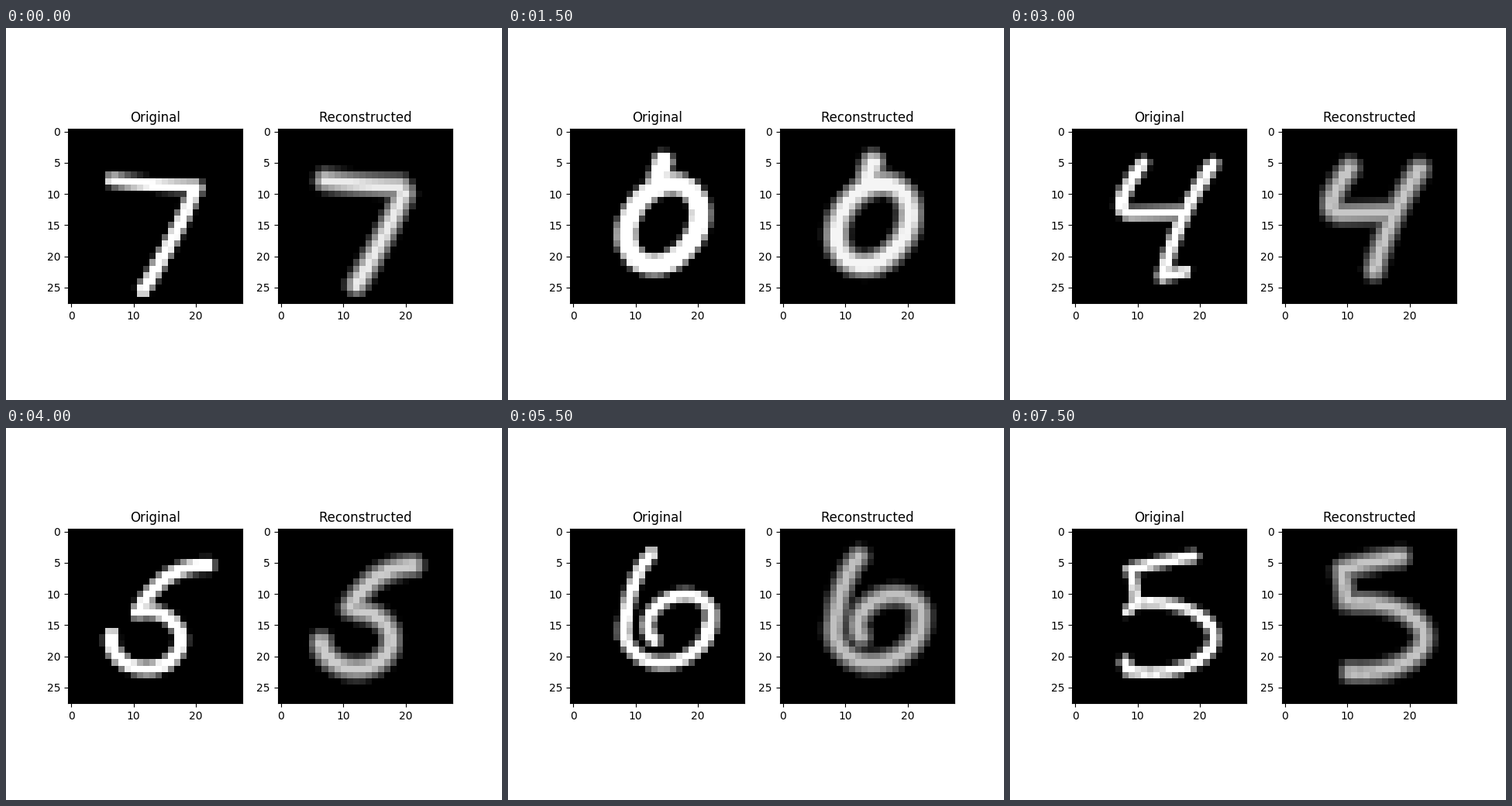
A matplotlib script for the animation above (8 s loop, 640 px wide and 480 px high).

```python
from math import comb

import numpy as np
import matplotlib.pyplot as plt
from matplotlib.animation import FuncAnimation

plt.rcParams["text.kerning_factor"] = 6

SIZE = 28
SAMPLES = 60
yy, xx = np.mgrid[:SIZE, :SIZE]
t = np.linspace(0, 1, SAMPLES)


def curve(*pts, r=1.0):
    """Bezier stroke of any degree with pen radius r."""
    n = len(pts) - 1
    basis = [comb(n, k) * t**k * (1 - t)**(n - k) for k in range(n + 1)]
    return np.array(pts, float).T @ basis, r


def arc(cx, cy, rx, ry, lean=0.0, start=-90, end=310, r=1.0):
    """Sheared ellipse stroke; lean pushes its top to the right."""
    a = np.radians(start + (end - start) * t)
    return np.array([cx + rx * np.cos(a) - lean * np.sin(a),
                     cy + ry * np.sin(a)]), r


def ink(strokes, soft=1.0):
    img = np.zeros((SIZE, SIZE))
    for (x, y), r in strokes:
        dist = np.hypot(xx[..., None] - x, yy[..., None] - y).min(axis=2)
        img = np.maximum(img, np.clip((r - dist) / soft + .5, 0, 1))
    return img


def digit(*strokes, fine=(), level=.92):
    """Sharp image and its reconstruction: softer, trimmed, no fine strokes."""
    smooth = [(pts[:, 3:-3], 1 + .4 * r) for pts, r in strokes]
    return ink([*strokes, *fine]), level * ink(smooth, soft=2)


def one(top, foot, r):
    return digit(curve(top, foot, r=r))


def nine(cx, cy, rx, ry, lean, bend, foot, r=1.1, fine=(), level=.86):
    return digit(arc(cx, cy, rx, ry, lean, r=r),
                 curve((cx + rx, cy), bend, foot, r=r + .25),
                 fine=fine, level=level)


def four(top, bend, elbow, cross, head, mid, foot, **kw):
    return digit(curve(top, bend, elbow), curve(elbow, cross),
                 curve(head, mid, foot), **kw)


pairs = [
    # 7
    digit(curve((6.6, 7.8), (11, 8.6), (20, 8.8)),
          curve((20, 9), (16.9, 16.8), (11.5, 25.4), r=1.1)),
    # 2
    digit(arc(12.2, 7.2, 3.8, 3, start=-190, end=20, r=1.3),
          curve((15.8, 8.2), (13, 14), (8.5, 16), (8.2, 20.3), r=1.3),
          curve((8.2, 20.6), (15, 21.2), (23.3, 20), r=1.3)),
    one((16, 4.6), (10.9, 22.7), r=1),
    # 0 with a knob on top
    digit(arc(14.4, 14.9, 5.7, 6.5, lean=1.5, r=1.65),
          curve((14.4, 4.9), (13.2, 8.8), r=1.6), level=.96),
    four((10.8, 5.8), (6, 15.5), (9, 15.2), (18.4, 13.8),
         (18.9, 7.5), (18.4, 15), (17.9, 23.4), level=.85),
    one((16.8, 6), (12.2, 23.2), r=1.3),
    four((10.8, 5.2), (5.5, 12.2), (8.5, 13.2), (17, 13),
         (22, 5.3), (16.5, 13.5), (14, 23.2), level=.78,
         fine=[curve((14, 23.2), (17.7, 22.4), r=.9)]),
    nine(11.7, 11.5, 3.4, 3.2, .8, (15, 18), (19.5, 25), r=1),
    # 5
    digit(curve((21.8, 5.5), (14.5, 5.5), (10.6, 13), r=1.1),
          arc(12, 17.4, 5.6, 4.6, start=-100, end=190, r=1.1), level=.8),
    nine(14.4, 11.2, 5.9, 3, 3, (15.2, 15.5), (10.5, 25), r=1.15, level=.9,
         fine=[curve((17.2, 9), (17.2, 11.2), r=.5)]),
    # 0
    digit(arc(14.5, 13.6, 5.7, 7.9, lean=1.2, r=1.35), level=.95),
    # 6
    digit(curve((12.5, 3.6), (8.3, 8.5), (8.2, 17)),
          arc(15.1, 15, 6.9, 6.1, lean=.8, start=190, end=-10),
          arc(17, 14.3, 5, 4.1, lean=1, start=20, end=-230), level=.75),
    nine(14, 11.3, 4.3, 3, 1.2, (17.5, 17), (15.6, 25), r=1),
    # 0
    digit(arc(14.4, 14.9, 6.1, 8.7, lean=.8, r=1.25), level=.95),
    one((15.8, 4.8), (13, 22.5), r=1),
    # 5
    digit(curve((19, 4.1), (14, 4.8), (8.7, 6.2), r=.9),
          curve((9, 6), (9.8, 11.5), r=.8),
          arc(12, 17, 10.2, 5.6, start=-105, end=110, r=.9), level=.77,
          fine=[curve((9.8, 11.5), (8.3, 12.8), r=.8),
                curve((8.5, 22.2), (8, 20.9), r=.9)]),
]

fig, axes = plt.subplots(1, 2, figsize=(6.4, 4.8), dpi=100)
views = []
for ax, title, img in zip(axes, ("Original", "Reconstructed"), pairs[0]):
    ax.set_title(title)
    views.append(ax.imshow(img, cmap="gray", vmin=0, vmax=1))


def update(i):
    for view, img in zip(views, pairs[i]):
        view.set_data(img)
    return views


anim = FuncAnimation(fig, update, frames=len(pairs), interval=500,
                     repeat=True, repeat_delay=0)
plt.show()
```
